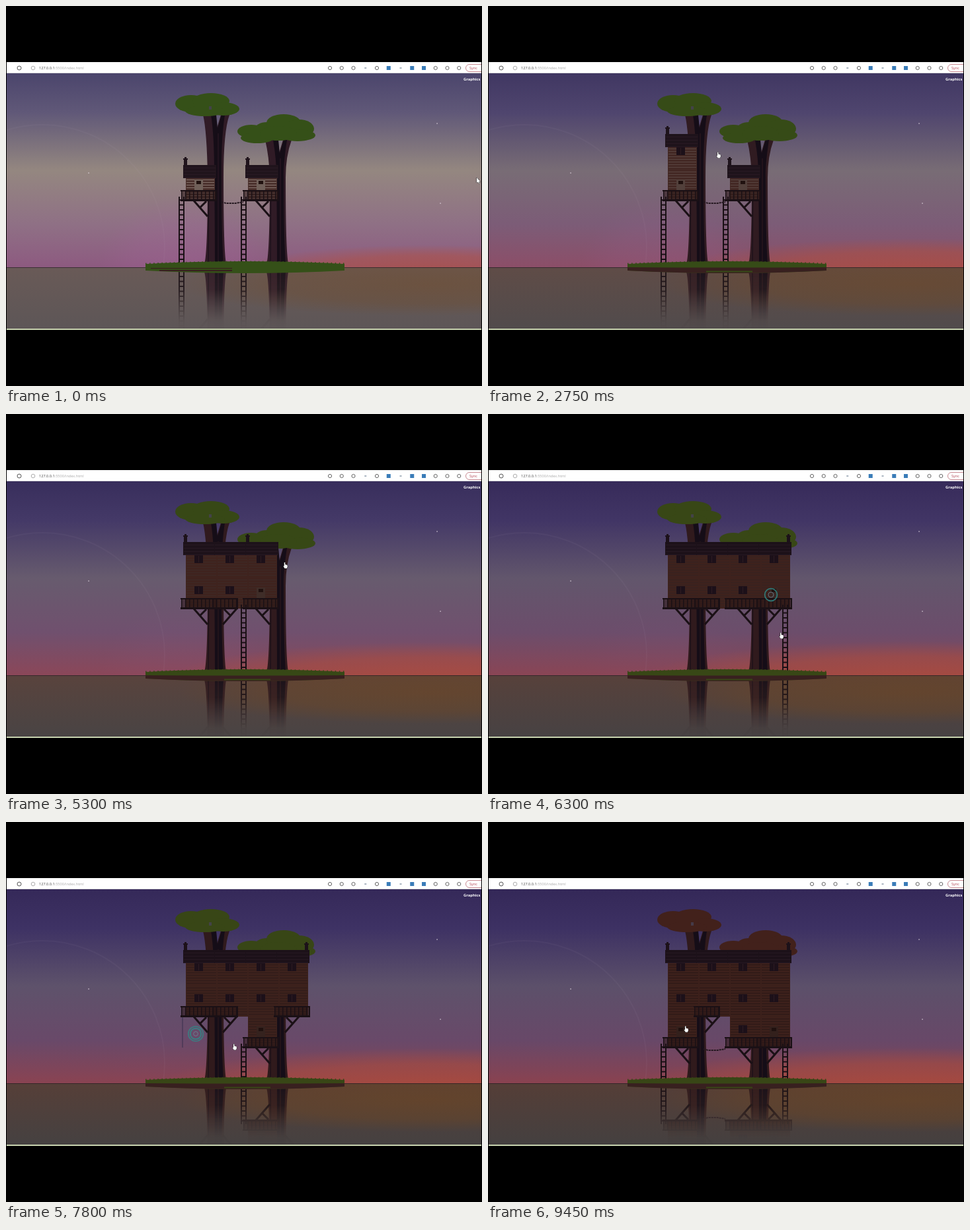
Write an HTML page with a canvas that moves like this. It is 720 by 576 pixels and loops after 9500 ms.

```html
<!DOCTYPE html>
<html lang="en">
<head>
<meta charset="utf-8">
<title>Treehouse builder</title>
<style>
html, body { margin: 0; width: 100%; height: 100%; overflow: hidden; background: #000; }
canvas { display: block; width: 720px; height: 576px; }
</style>
</head>
<body>
<canvas id="stage" width="720" height="576"></canvas>
<script>
const LOOP = 9500, SHORE = 397, PITCH = 47, INK = '#1a1015';
const stage = document.getElementById('stage').getContext('2d');
const scene = makeLayer(), water = makeLayer();

// Colours at the start and the end of dusk
const SKY = [
  ['4b456c', '342858'], ['605878', '3d3163'], ['948780', '5c506a'],
  ['8f7085', '684868'], ['8d5a80', '8a4250']
];
const PALETTE = {
  waterTop: ['695a57', '553e37'],
  waterLow: ['5d5657', '444040'],
  trunk: ['301b26', '301a1c'],
  wall: ['4a302c', '3c201b'],
  plank: ['83706a', '2c1816'],
  door: ['706059', '33201c'],
  roof: ['20141c', '1c1119'],
  leaf: ['355018', '384616']
};

// Clicks toggle a cell: [time, column, row]
const START = [[0, 0, 1], [0, 2, 1]];
const CLICKS = [[1400, 0, 0], [3050, 1, 0], [4000, 2, 0], [4700, 1, 1], [5400, 3, 0],
  [6150, 3, 1], [7000, 2, 2], [7550, 0, 2], [7700, 0, 2], [8500, 3, 2], [9100, 0, 2]];
// Where the pointer rests between clicks: [time, x, y]
const RESTS = [[0, 713, 264], [1150, 304, 230], [2750, 349, 226], [4200, 338, 271],
  [6300, 444, 336], [7800, 346, 341], [9450, 300, 314]];

const left = column => 272 + column * PITCH;
const floorOf = row => 248 + row * PITCH;
const clickSpot = ([time, column, row]) => [time, left(column) + 15, floorOf(row) - 21];
const path = [...RESTS, ...CLICKS.map(clickSpot)].sort((a, b) => a[0] - b[0]);
const lerp = (a, b, k) => a + (b - a) * k;

function makeLayer() {
  const canvas = document.createElement('canvas');
  canvas.width = 720;
  canvas.height = 576;
  return canvas.getContext('2d');
}
function mix([a, b], k) {
  const part = (hex, i) => parseInt(hex.substr(i, 2), 16);
  return 'rgb(' + [0, 2, 4].map(i => Math.round(lerp(part(a, i), part(b, i), k))) + ')';
}
function rect(c, color, x, y, w, h) {
  c.fillStyle = color;
  c.fillRect(x, y, w, h);
}
function line(c, color, width, ...points) {
  c.strokeStyle = color;
  c.lineWidth = width;
  c.beginPath();
  for (let i = 0; i < points.length; i += 2) c.lineTo(points[i], points[i + 1]);
  c.stroke();
}
function shape(c, color, d) {
  c.fillStyle = color;
  c.fill(new Path2D(d));
}
function ring(c, color, width, x, y, r) {
  c.strokeStyle = color;
  c.lineWidth = width;
  c.beginPath();
  c.arc(x, y, r, 0, 7);
  c.stroke();
}
function gradient(c, y0, y1, stops) {
  const g = c.createLinearGradient(0, y0, 0, y1);
  stops.forEach(([at, color]) => g.addColorStop(at, color));
  return g;
}
function clipTo(y, h, paint) {
  stage.save();
  stage.beginPath();
  stage.rect(1, y, 718, h);
  stage.clip();
  paint();
  stage.restore();
}
function glow(x, y, rx, ry, rgb, alpha) {
  stage.save();
  stage.translate(x, y);
  stage.scale(rx, ry);
  const g = stage.createRadialGradient(0, 0, 0, 0, 0, 1);
  g.addColorStop(0, `rgba(${rgb},${alpha})`);
  g.addColorStop(.6, `rgba(${rgb},${alpha * .7})`);
  g.addColorStop(1, `rgba(${rgb},0)`);
  rect(stage, g, -1, -1, 2, 2);
  stage.restore();
}

function drawSky(dusk) {
  const at = [0, .2, .5, .78, 1];
  const stops = SKY.map((pair, i) => [at[i], mix(pair, dusk)]);
  clipTo(102, 295, () => {
    rect(stage, gradient(stage, 102, 396, stops), 0, 102, 720, 295);
    glow(270, 395, 130, 105, '165,98,155', .3 * (1 - dusk));
    glow(640, 402, lerp(290, 420, dusk), lerp(40, 60, dusk), '184,78,52', .62);
    ring(stage, 'rgba(190,170,190,.05)', 2, 55, 365, 185);
  });
  for (const [x, y] of [[125, 253], [652, 178], [657, 299]])
    rect(stage, 'rgba(225,215,225,.7)', x - .7, y - .7, 1.6, 1.6);
}

function drawTrunk(c, color, x, top) {
  const dark = '#150d17', fork = top + 20;
  c.save();
  c.translate(x, 0);
  shape(c, color, `M-1 391Q4 375 4 260Q3 ${top + 25} -3 ${top}H16L18 ${fork}L24 ${top}H37Q28 ${top + 25} 28 260Q28 370 32 391Z`);
  shape(c, dark, `M9 ${top}H17L19 ${fork}L25 ${top}H30Q24 ${top + 40} 25 260Q25 350 28 391H15Q15 330 14 255Q14 ${top + 30} 9 ${top}Z`);
  line(c, color, 1, 20, fork + 8, 20, 390);
  line(c, dark, 1, 6, 245, 5, 390);
  c.restore();
}

function drawLeaves(c, color, x, y, puffs) {
  c.fillStyle = color;
  for (const [dx, dy, rx, ry] of puffs) {
    c.beginPath();
    c.ellipse(x + dx, y + dy, rx, ry, 0, 0, 7);
    c.fill();
  }
}

function drawTrees(c, col) {
  drawTrunk(c, col.trunk, 301, 165);
  drawTrunk(c, col.trunk, 301 + 2 * PITCH, 203);
  drawLeaves(c, col.leaf, 305, 150, [[-25, -2, 24, 13], [5, -6, 28, 12], [24, 6, 24, 10], [-4, 9, 30, 8]]);
  drawLeaves(c, col.leaf, 410, 186, [[-39, 4, 21, 10], [-15, 1, 19, 11], [10, -9, 26, 13],
    [33, 0, 23, 14], [31, 10, 27, 9], [-30, 14, 25, 8], [2, 7, 28, 11]]);
  rect(c, 'rgba(70,65,85,.8)', 307, 152, 4, 5);
}

// Which cells stand at time t, with the questions the drawing asks of them
function buildingAt(t) {
  const past = [...START, ...CLICKS].filter(b => b[0] <= t);
  const has = (x, y) => past.filter(b => b[1] === x && b[2] === y).length % 2 === 1;
  const cells = [];
  for (let y = 0; y < 3; y++)
    for (let x = 0; x < 4; x++) if (has(x, y)) cells.push([x, y]);
  const base = cells[cells.length - 1][1];
  const hasLadder = (x, y) => y === base && !has(x + 1, y);
  return { cells, has, base, hasLadder };
}

function drawCell(c, col, x, y, { has, hasLadder }) {
  const floor = floorOf(y), height = has(x, y - 1) ? PITCH : 35;
  const width = has(x + 1, y) ? PITCH : 44;
  rect(c, col.wall, left(x), floor - height, width, height);
  for (let d = 4; d < height; d += 4) rect(c, col.plank, left(x) + 1, floor - d, width - 2, 1);
  const mid = left(x) + 19, wy = floor - 28;
  if (hasLadder(x, y)) {
    rect(c, col.door, mid - 6, wy - 4, 13, 18);
    rect(c, '#20110f', mid - 3, wy - 2, 7, 5);
  } else {
    rect(c, '#1c1019', mid - 6, wy - 6, 13, 12);
    rect(c, 'rgba(80,50,50,.35)', mid, wy - 5, 1, 10);
  }
}

function drawRoof(c, col, x, y, { has }) {
  const top = floorOf(y) - 54;
  rect(c, col.roof, left(x) - 4, top, 50, 20);
  for (let d = 4; d < 20; d += 5) rect(c, 'rgba(70,45,60,.25)', left(x) - 3, top + d, 48, 1);
  if (x === 1 || (x === 2 && has(3, y))) return;
  const stack = left(x) + (x === 3 ? 41 : -1);
  rect(c, col.roof, stack - 2, top - 8, 5, 10);
  rect(c, col.roof, stack - 3, top - 10, 7, 2);
  rect(c, col.roof, stack - 1, top - 12, 3, 2);
}

function drawDeck(c, x, y) {
  const floor = floorOf(y), from = left(x) - 7, to = left(x) + (x === 1 ? 31 : 46);
  // Braces lean on the trunk, so odd columns mirror even ones
  const lean = d => left(x) + (x % 2 ? 42 - d : d);
  line(c, INK, 3, lean(12), floor, lean(33), floor + 24);
  line(c, INK, 3, lean(21), floor + 11, lean(31), floor + 1);
  rect(c, 'rgba(42,22,22,.55)', from, floor - 15, to - from, 14);
  rect(c, INK, from - 1, floor - 16, to - from + 2, 2);
  rect(c, INK, from - 1, floor - 2, to - from + 2, 3);
  for (let p = from; p <= to; p += 6) rect(c, INK, p, floor - 15, 1.5, 14);
  rect(c, INK, to - 1, floor - 15, 2, 14);
}

function drawLadder(c, x, y) {
  const mid = left(x) + (x % 2 ? 36 : -7), top = floorOf(y) - 6;
  for (const rail of [mid - 4, mid + 3]) rect(c, INK, rail, top, 2, 391 - top);
  for (let rung = top + 4; rung < 390; rung += 7.5) rect(c, INK, mid - 3, rung, 7, 2);
}

function drawHouses(c, t, col) {
  const building = buildingAt(t), { cells, has, base, hasLadder } = building;
  for (const [x, y] of cells) drawCell(c, col, x, y, building);
  for (const [x, y] of cells) {
    if (!has(x, y - 1)) drawRoof(c, col, x, y, building);
    if (!has(x, y + 1)) drawDeck(c, x, y);
    if (hasLadder(x, y)) drawLadder(c, x, y);
  }
  if (has(0, base) && has(2, base) && !has(1, base)) {
    const y = floorOf(base) + 2;
    c.setLineDash([3, 1]);
    line(c, '#251820', 2, 326, y, 333, y + 2, 347, y + 2, 359, y);
    c.setLineDash([]);
  }
}

function drawWater(col, dusk) {
  const fade = [[0, .9], [.35, .8], [.6, .4], [.85, .06], [1, 0]].map(([at, a]) => [at, `rgba(0,0,0,${a})`]);
  water.globalCompositeOperation = 'copy';
  water.setTransform(1, 0, 0, -1, 0, SHORE * 2);
  water.drawImage(scene.canvas, 0, 0);
  water.resetTransform();
  water.globalCompositeOperation = 'destination-in';
  rect(water, gradient(water, SHORE, 490, fade), 0, 0, 720, 576);
  clipTo(396, 94, () => {
    rect(stage, gradient(stage, SHORE, 490, [[0, col.waterTop], [1, col.waterLow]]), 0, 396, 720, 94);
    glow(640, 422, 380, 48, '116,72,30', lerp(.4, .5, dusk));
    stage.drawImage(water.canvas, 0, 0);
    rect(stage, 'rgba(35,25,35,.65)', 0, 396, 720, 1);
  });
}

function drawIsland(t, col) {
  const soil = '#38201f', bank = 'V401Q440 405 362 405Q285 405 211 401Z';
  shape(stage, col.grass, 'M211 391Q285 387 362 387Q440 387 512 391' + bank);
  if (t < 2000) {
    rect(stage, soil, 219, 397, 123, 1.2);
    rect(stage, soil, 232, 400, 110, 2);
  } else {
    shape(stage, soil, 'M211 396Q362 397 512 396' + bank);
    rect(stage, col.grass, 330, 401.5, 70, 2);
  }
  for (let i = 0; i < 50; i++)
    rect(stage, col.grass, 211 + i * 6.1, 389.5 - Math.sin(i / 50 * Math.PI) * 3, 1.5, 3);
}

function drawBrowser() {
  const c = stage;
  rect(c, '#fff', 1, 85, 718, 17);
  rect(c, '#d8d8dc', 1, 101, 718, 1);
  ring(c, '#555', 1, 20, 94, 3);
  ring(c, '#999', .8, 41, 94, 2.8);
  c.font = '5.6px "Open Sans", sans-serif';
  c.fillStyle = '#444';
  c.fillText('127.0.0.1', 50, 96);
  const host = c.measureText('127.0.0.1').width;
  c.fillStyle = '#aaa';
  c.fillText(':5500/index.html', 50 + host, 96);
  for (let i = 0; i < 12; i++) {
    const x = 490 + i * 17.75;
    if (i === 3 || i === 6) rect(c, '#a9b4c0', x - 1, 93, 3, 2);
    else if (i > 4 && i < 9) rect(c, '#3a7cb8', x - 3, 91, 6, 6);
    else ring(c, '#666', 1, x, 94, 2.6);
  }
  clipTo(85, 40, () => {
    c.strokeStyle = '#c98b93';
    c.lineWidth = 1;
    c.beginPath();
    c.roundRect(695.5, 88.5, 40, 11, 5.5);
    c.stroke();
    c.fillStyle = '#b0414f';
    c.fillText('Sync', 701, 96);
    c.fillStyle = '#fff';
    c.font = 'bold 5.8px "Open Sans", sans-serif';
    c.fillText('Graphics S', 692, 113);
  });
}

function drawPointer(t) {
  const c = stage;
  if (t >= 950 && t < 1400) line(c, 'rgba(35,25,45,.75)', 1, 267.5, 247, 267.5, 207, 273, 201.5, 303, 201.5);
  if (t >= 7400 && t < 7900) line(c, 'rgba(45,40,70,.8)', 1, 267, 296, 267, 342);
  for (const [start, x, y] of CLICKS.map(clickSpot)) {
    const k = (t - start) / 300;
    if (k < 0 || k > 1) continue;
    c.globalAlpha = 1 - k * .35;
    ring(c, '#2f8b88', 1.8, x, y, 3 + 9 * Math.sqrt(k));
    if (k < .6) ring(c, '#6b8293', 1, x, y, 2 + 4 * k);
    c.globalAlpha = 1;
  }
  const next = Math.max(1, path.findIndex(p => p[0] >= t));
  const [a, b] = [path[next - 1], path[next]];
  const k = (t - a[0]) / (b[0] - a[0]), eased = k * k * (3 - 2 * k);
  clipTo(102, 388, () => {
    c.translate(lerp(a[1], b[1], eased), lerp(a[2], b[2], eased));
    const hand = new Path2D(t < 700 ? 'M-1 -4V4L1 2.5L2.3 5L3.5 4.4L2.5 2H4.5Z'
      : 'M-2 -4.5H-.6V-1.5L2.6 -.7L3 2L1.8 4.5H-1.2L-3.4 1L-2 .8Z');
    c.strokeStyle = '#222';
    c.lineWidth = 1;
    c.stroke(hand);
    c.fillStyle = '#fff';
    c.fill(hand);
  });
}

function draw(t) {
  const dusk = 1 - (1 - t / LOOP) ** 2;
  const col = {};
  for (const name in PALETTE) col[name] = mix(PALETTE[name], dusk);
  col.grass = col.leaf;
  if (t >= 9000) col.leaf = '#42211b';
  rect(stage, '#000', 0, 0, 720, 576);
  drawSky(dusk);
  scene.clearRect(0, 0, 720, 576);
  drawTrees(scene, col);
  drawHouses(scene, t, col);
  drawWater(col, dusk);
  stage.drawImage(scene.canvas, 0, 0);
  drawIsland(t, col);
  rect(stage, '#c8d4b0', 1, 489, 718, 2);
  drawBrowser();
  drawPointer(t);
}

const begin = performance.now();
function tick() {
  const t = Math.max(0, performance.now() - begin) % LOOP;
  draw(Math.min(Math.floor(t / 50) * 50, 9450));
  requestAnimationFrame(tick);
}
tick();
</script>
</body>
</html>
```
